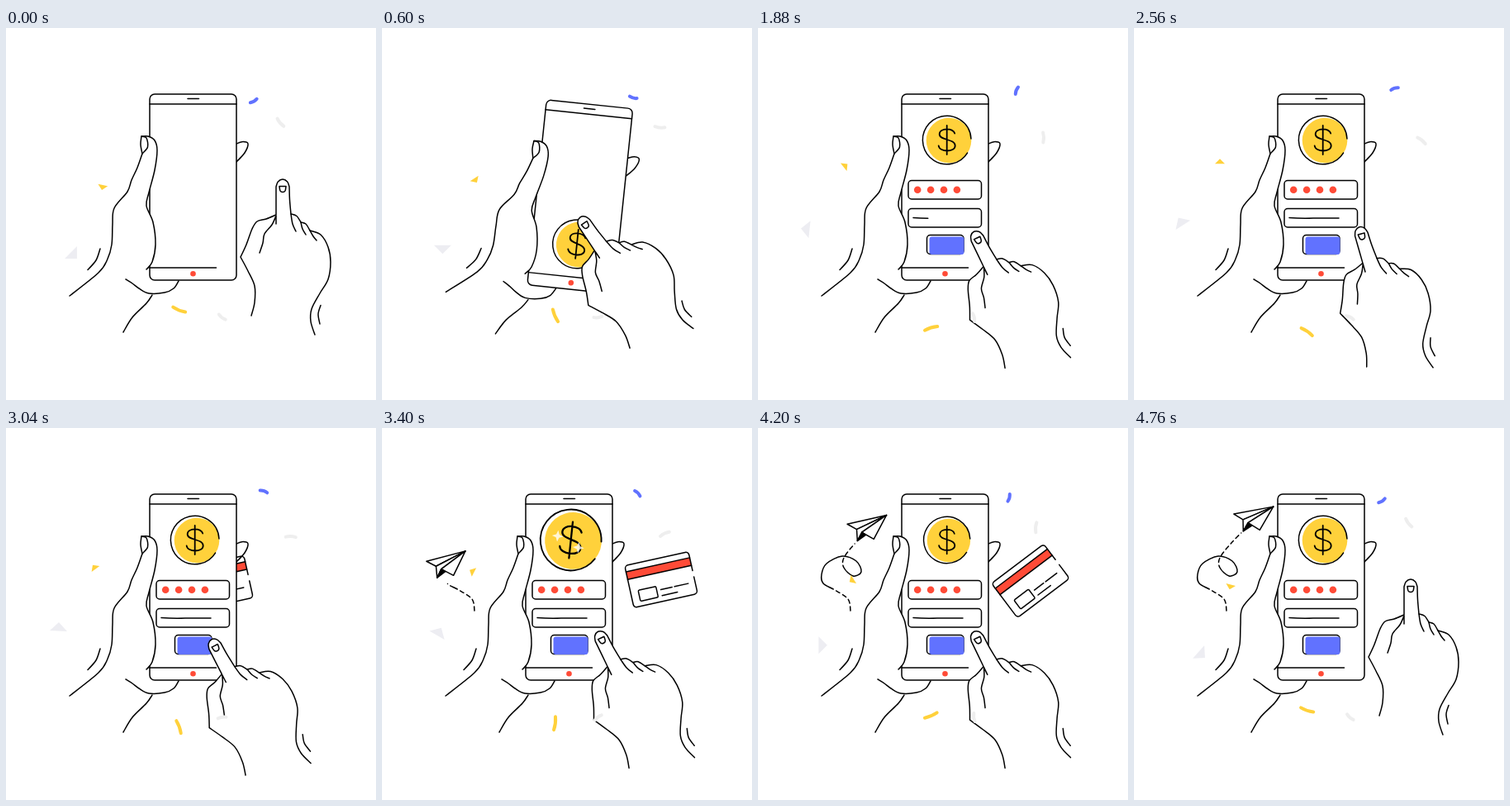
Write an HTML page that moves like this. It is 448 px wide and 450 px high and loops after 4.8 s.

```html
<!DOCTYPE html>
<html lang="en">
<head>
<meta charset="utf-8">
<title>Mobile payment</title>
<style>
html, body { margin: 0; width: 100%; height: 100%; overflow: hidden; background: #fff; }
svg { display: block; width: 100%; height: 100%; }
.ink { fill: none; stroke: #000; stroke-width: 1.5; stroke-linecap: round; stroke-linejoin: round; }
.paper { fill: #fff; }
.bare { stroke: none; }
.yellow { fill: #ffd13b; }
.blue { fill: #6172ff; }
.red { fill: #ff4b37; }
</style>
</head>
<body>
<!-- data-line: points of a smooth curve, "/" marks a corner -->
<svg viewBox="0 0 448 450">
  <g id="card" class="ink">
    <rect class="paper bare" x="-39.5" y="-26" width="79" height="52" rx="4"/>
    <path class="red bare" d="M-39.5 -18.5h79v9.5h-79z"/>
    <rect x="-39.5" y="-26" width="79" height="52" rx="4" pathLength="100" stroke-dasharray="38 3 59 0"/>
    <path d="M-39.5 -18.5h79m-79 9.5h79"/>
    <rect x="-30" y="6.5" width="22" height="13.5" rx="1.5"/>
    <path d="M-3 11.6h14m3 0h17M-3 19h19"/>
  </g>

  <g id="device" class="ink">
    <path data-line="279,140 287,137.5 293,140 289,151 279,162"/>
    <path data-line="145,304 153,309 161,315 173,321 192,320 203,315 209,306"/>
    <path data-line="177,323 170,333 153,350 142,368"/>
    <rect class="paper" x="174" y="80" width="105" height="225" rx="6"/>
    <path d="M174 92h105M220 85.5h13.5M174 290h80.5"/>
    <circle class="red bare" cx="226.5" cy="297.2" r="3.3"/>

    <g class="row">
      <rect class="paper" x="182" y="184.5" width="88.5" height="22.5" rx="4"/>
      <g id="dots" class="red bare"></g>
    </g>
    <g class="row">
      <rect class="paper" x="182" y="218.5" width="88.5" height="22.5" rx="4"/>
      <path id="entry" d="M188 229.5q14 1 29 .5h31" pathLength="1" stroke-dasharray="1 2"/>
    </g>
    <g class="row">
      <rect class="paper" x="204.5" y="250.5" width="44.5" height="23" rx="4"/>
      <rect class="blue bare" x="207.5" y="252.500" width="42" height="21.5" rx="3"/>
    </g>

    <g id="coin">
      <circle class="paper bare" r="29"/>
      <circle class="yellow bare" cx="2.3" cy=".5" r="27.3"/>
      <circle r="29.3" pathLength="360" stroke-dasharray="325 35" transform="rotate(32)"/>
      <path d="M9.5 -8C8 -15 -9 -15 -9 -7C-9 1 10 -2 10 7C10 15 -9 15 -10 7M0 -17.5v35" stroke-width="1.8"/>
      <g id="sparkles" class="paper bare">
        <path id="star" d="M8 1l1.5 4l4 1.5l-4 1.5l-1.5 4l-1.5 -4l-4 -1.5l4 -1.5z"/>
        <use href="#star" x="-21" y="-9"/>
      </g>
    </g>

    <path class="paper" data-line="170,292 177,283 181,262 178,235 170,215 173,199 180,172 183,148 180,136 172,131 164,131 / 163,141 165,152 / 159,169 152,184 147,198 131,218 129,238 128,262 122.7,280 112,296 77,324"/>
    <path data-line="164,131 170,133 171.5,144 165,152"/>
    <path data-line="114,267 109,281 99,292.5"/>
  </g>

  <g class="ink">
    <path id="trail" data-line="112,221 109,207 93,196 79,188 77,177 83,164 102,155 119,161 125,174 115,179 104,169 104,157 118,139 136,121 149,109.5"/>
    <g id="plane">
      <path class="paper" d="M20 -14L-28 -6L-17 1z"/>
      <path class="paper" d="M20 -14L-17 1v14L-11 5z"/>
      <path class="paper" d="M20 -14L-11 5L3 14z"/>
      <path fill="#000" d="M-17 15L-11 5l4.5 3.5z"/>
    </g>
  </g>

  <g id="pointer" class="ink">
    <path class="paper" data-line="297,348 301,332 301,312 293,294 284,277 / 291,262 298,243 304,234 315,231 327,226 / 327,192 / 329.3,186 335,183 340.7,186 343,192 / 343.5,208 345,225 / 352,227.5 357,235 / 363,237 368,245 / 381,250 390,265 393,283 390,304 380,321 370,340 369,355 374,371"/>
    <path data-line="345,225 347,237 351,246"/>
    <path data-line="357,235 359,243 363,250"/>
    <path data-line="368,245 372,252 376,257"/>
    <path data-line="381,335.5 378,346 380,358"/>
    <path data-line="327,237 327,227 / 322,238 313,249 311,260 307,272"/>
    <path data-line="331,191.5 339,191.5 / 338,197 335,198.5 332,197 331,191.5"/>
  </g>

  <g id="confetti"></g>
</svg>

<script>
const LOOP = 4800, STEP = 40;
const $ = id => document.getElementById(id);

const mix = (a, b, p) => a + (b - a) * p;
const span = (t, from, to) => Math.min(1, Math.max(0, (t - from) / (to - from)));
const ramp = (t, from, to) => (p => p * p * (3 - 2 * p))(span(t, from, to));
const bump = (t, from, to) => Math.sin(Math.PI * span(t, from, to)) ** 2;

const set = (el, attrs) => {
  for (const name in attrs) el.setAttribute(name, attrs[name]);
  return el;
};
const add = (parent, tag, attrs) =>
  parent.appendChild(set(document.createElementNS('http://www.w3.org/2000/svg', tag), attrs));
const place = (el, x, y, turn = 0, size = 1) =>
  set(el, { transform: `translate(${x} ${y}) rotate(${turn}) scale(${size})` });
const show = (el, on) => set(el, { visibility: on ? 'visible' : 'hidden' });

// Catmull-Rom curve through each run of points
function spline(text) {
  let d = '', last;
  for (const run of text.split('/')) {
    const pts = run.trim().split(' ').map(p => p.split(',').map(Number));
    if (last) pts.unshift(last);
    else d = 'M' + pts[0];
    for (let i = 0; i + 1 < pts.length; i++) {
      const [b, c] = [pts[i], pts[i + 1]];
      const a = pts[i - 1] || b, e = pts[i + 2] || c;
      d += 'C' + [b.map((v, k) => v + (c[k] - a[k]) / 6), c.map((v, k) => v - (e[k] - b[k]) / 6), c];
    }
    last = pts[pts.length - 1];
  }
  return d;
}
document.querySelectorAll('[data-line]').forEach(el => set(el, { d: spline(el.dataset.line) }));

const dash = half => `M${-half} -.5Q0 1.2 ${half} -.5`;
const YELLOW = '#ffd13b', BLUE = '#6172ff', GRAY = '#eee';

// Each piece drifts out and back while turning once per loop
function piece(d, color, x, y, dx, dy, turn, dir, solid) {
  const paint = solid ? { fill: color } : { fill: 'none', stroke: color, 'stroke-width': 4, 'stroke-linecap': 'round' };
  const el = add($('confetti'), 'path', { d, ...paint });
  return (out, lap) => place(el, x + dx * out, y + dy * out, turn + dir * 360 * lap);
}
const confetti = [
  piece(dash(4.5), BLUE, 300, 88.5, 16.5, -16.5, -30, 1),
  piece(dash(6), GRAY, 332, 114.5, 17.5, 23, 50, -1),
  piece(dash(8), YELLOW, 209.5, 341, 0, 28, 22, 1),
  piece(dash(5), GRAY, 261.5, 350, 0, 0, 38, -1),
  piece('M-6 -3H6L0 3z', YELLOW, 116.7, 193, -13.6, -34, 12, -1, true),
  piece('M0 -10.5v21l10.5 -10.5z', '#ededf2', 78.5, 271.5, -20.5, -35.5, 45, 1, true)
];

const rows = [...document.querySelectorAll('.row')];
const dots = [0, 1, 2, 3].map(i => add($('dots'), 'circle', { cx: 193.2 + i * 15.9, cy: 195.7 }));

function drawForm(t) {
  const settle = 2 * bump(t, 1080, 1480);
  rows.forEach((row, i) => {
    const shown = ramp(t, 840 + i * 50, 1080 + i * 50);
    place(row, 0, 24 * (1 - shown) - settle);
    set(row, { opacity: shown });
  });
  dots.forEach((dot, i) => set(dot, { r: 4.3 * ramp(t, 1080 + i * 80, 1220 + i * 80) }));

  const typed = ramp(t, 1720, 2160);
  set($('entry'), { 'stroke-dashoffset': 1 - typed });
  show($('entry'), typed > 0);
}

function drawCoin(t) {
  const pulse = bump(t, 3040, 3760);
  const size = ramp(t, 360, 540) + 0.26 * pulse - 0.04 * bump(t, 3760, 4640);
  const y = mix(280, 135.5, ramp(t, 400, 1080)) - 1.5 * bump(t, 1080, 1480);
  place($('coin'), 228.7, y, 6 * pulse, size);
  show($('coin'), size > 0);
  set($('sparkles'), { opacity: 0.8 * bump(t, 3120, 3680) });
}

function drawCard(t) {
  const out = ramp(t, 2920, 3280) - ramp(t, 4240, 4520);
  const swing = ramp(t, 3400, 4200);
  place($('card'), mix(226, 338 - 8 * swing, out), mix(190, 183.5 + 1.5 * swing, out), -12.5 - 24.5 * swing);
  show($('card'), out > 0);
}

const trail = $('trail'), length = trail.getTotalLength();

// Dashes outside the loop, one solid stroke inside it
function dashes(shown) {
  const list = [], loopEnd = length * 0.68;
  for (let s = 0; s < shown;) {
    const end = s > length * 0.14 && s < loopEnd ? loopEnd : s + 5;
    list.push(Math.min(end, shown) - s, 4);
    s = end + 4;
  }
  return [...list, 0, 999].join(' ');
}

function drawPlane(t) {
  const s = length * Math.sin(span(t, 3100, 4550) * Math.PI / 2);
  const p = trail.getPointAtLength(s);
  const a = trail.getPointAtLength(Math.max(0, s - 1));
  const b = trail.getPointAtLength(Math.min(length, s + 1));
  const heading = Math.atan2(b.y - a.y, b.x - a.x) * 180 / Math.PI;
  place($('plane'), p.x, p.y, heading + 40, ramp(t, 3100, 3240));
  set(trail, { 'stroke-dasharray': dashes(s - 30) });
  show($('plane'), s > 0);
  show(trail, s > 30);
}

// Fingertip position and turn of the hand
const away = [335, 191, 0], grab = [239.5, 271, -34.5], fling = [249.5, 200, -33],
  hover = [268.5, 251.5, -24], rest = [265, 253.5, -25.8],
  lift = [275, 248.5, -16], press = [243, 270, -28];
const moves = [
  [grab, 0, 400], [fling, 400, 800], [hover, 800, 1260], [rest, 1260, 1480],
  [lift, 2200, 2560], [press, 2560, 2840], [rest, 2840, 3280], [away, 4480, 4760]
];

function drawPointer(t) {
  const [x, y, turn] = moves.reduce(
    (pose, [goal, from, to]) => pose.map((v, k) => mix(v, goal[k], ramp(t, from, to))), away);
  set($('pointer'), { transform: `translate(${x} ${y}) rotate(${turn}) translate(-335 -191)` });
}

function draw(t) {
  const lap = t / LOOP;
  confetti.forEach(move => move(1 - Math.abs(1 - 2 * lap), lap));
  const tilt = 6 * (ramp(t, 80, 560) - ramp(t, 680, 1120));
  set($('device'), { transform: `rotate(${tilt} 122 325)` });
  drawForm(t);
  drawCoin(t);
  drawCard(t);
  drawPlane(t);
  drawPointer(t);
}

const start = performance.now();
function tick() {
  const t = (performance.now() - start) % LOOP;
  draw(Math.floor(t / STEP) * STEP);
  requestAnimationFrame(tick);
}
tick();
</script>
</body>
</html>
```
